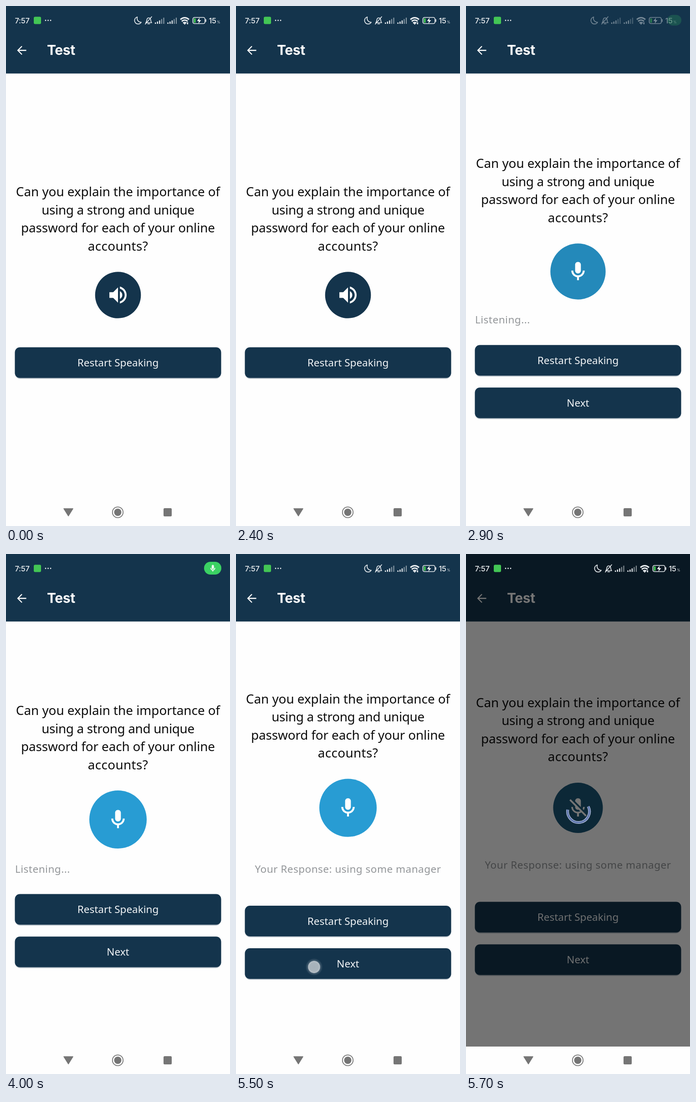
An HTML page for the animation above (5.8 s loop, 492x1137 px).

```html
<!DOCTYPE html>
<html lang="en">
<head>
<meta charset="utf-8">
<title>Speaking test</title>
<style>
  html, body { margin: 0; width: 100%; height: 100%; overflow: hidden; background: #fefefe; }
  svg { display: block; width: 492px; height: 1137px; }
  .soft { filter: blur(.4px); }
  text { font-family: "Noto Sans", "Open Sans", sans-serif; }
  .question { font-size: 27.8px; fill: #0c0c0c; text-anchor: middle; }
  .label { font-size: 22.5px; fill: #f1f4f6; text-anchor: middle; }
  .answer { font-size: 22.5px; letter-spacing: .5px; fill: #939699; }
  .title { font: 700 30px Inter, sans-serif; letter-spacing: -.4px; fill: #fff; }
  .clock { font: 500 16.5px Inter, sans-serif; letter-spacing: -.3px; fill: #edf0f2; }
  .line { fill: none; stroke: #e8ecef; stroke-width: 1.7; stroke-linecap: round; stroke-linejoin: round; }
</style>
</head>
<body>
<svg viewBox="0 0 492 1137">
  <defs>
    <path id="mic" d="M12 14c1.66 0 3-1.34 3-3V5c0-1.66-1.34-3-3-3S9 3.34 9 5v6c0 1.66 1.34 3 3 3zM17 11c0 2.76-2.24 5-5 5s-5-2.24-5-5H5c0 3.53 2.61 6.43 6 6.92V21h2v-3.08c3.39-.49 6-3.39 6-6.92h-2z"/>
    <g id="button">
      <rect x="19.5" y="-32" width="453" height="67.5" rx="12" fill="#14344c" opacity=".3"/>
      <rect x="19.5" y="-33.5" width="453" height="67" rx="11" fill="#14344c"/>
    </g>
    <g id="signal" fill="#e8ecef">
      <path d="M0 36h2.4v3H0zM4.6 34H7v5H4.6zM9.2 31.5h2.4V39H9.2z"/>
      <path d="M13.8 28.5H16V39h-2.2zM18.4 25.5h2.2V39h-2.2z" opacity=".55"/>
    </g>
    <radialGradient id="touchFill">
      <stop offset="0" stop-color="#a6b1ba"/>
      <stop offset=".5" stop-color="#a9b4bc"/>
      <stop offset=".66" stop-color="#b9c2c9"/>
      <stop offset=".74" stop-color="#8393a0" stop-opacity=".4"/>
      <stop offset="1" stop-color="#8393a0" stop-opacity="0"/>
    </radialGradient>
  </defs>

  <g class="soft">
    <rect x="-5" y="-5" width="502" height="1147" fill="#fefefe"/>
    <rect x="-5" y="-5" width="502" height="152.6" fill="#14344c"/>
    <path d="M44.5 97H27M35 88l-9 9 9 9" fill="none" stroke="#fff" stroke-width="2.3"/>
    <text class="title" x="90" y="107">Test</text>

    <g id="question" class="question">
      <text x="246" y="10">Can you explain the importance of</text>
      <text x="246" y="49.5" letter-spacing="-.3">using a strong and unique</text>
      <text x="246" y="89" letter-spacing="-.1">password for each of your online</text>
      <text x="246" y="128.5" letter-spacing=".4">accounts?</text>
    </g>

    <ellipse id="disc" cx="246"/>
    <g id="icons" fill="#fff">
      <path d="M3 9v6h4l5 5V4L7 9H3zM16.5 12c0-1.77-1.02-3.29-2.5-4.03v8.05c1.48-.73 2.5-2.25 2.5-4.02zM14 3.23v2.06c2.89.86 5 3.54 5 6.71s-2.11 5.85-5 6.71v2.06c4.01-.91 7-4.49 7-8.77s-2.99-7.86-7-8.77z"/>
      <use href="#mic"/>
      <path d="M19 11h-1.7c0 .74-.16 1.43-.43 2.05l1.23 1.23c.56-.98.9-2.09.9-3.28zm-4.02.17c0-.06.02-.11.02-.17V5c0-1.66-1.34-3-3-3S9 3.34 9 5v.18l5.98 5.99zM4.27 3L3 4.27l6.01 6.01V11c0 1.66 1.33 3 2.99 3 .22 0 .44-.03.65-.08l1.66 1.66c-.71.33-1.5.52-2.31.52-2.76 0-5.3-2.1-5.3-5.1H5c0 3.41 2.72 6.23 6 6.72V21h2v-3.28c.91-.13 1.77-.45 2.54-.9L19.73 21 21 19.73 4.27 3z"/>
    </g>

    <text id="answer" class="answer"></text>
    <g id="restart"><use href="#button"/><text class="label" x="246" y="8">Restart Speaking</text></g>
    <g id="next"><use href="#button"/><text class="label" x="246" y="8">Next</text></g>
    <circle id="touch" cx="171.5" cy="903" r="19" fill="url(#touchFill)"/>

    <rect id="shade" x="-5" y="-5" width="502" height="1082"/>
    <g id="spinner" fill="none">
      <path d="M268.5 552A24 24 0 1 1 223.5 559" stroke="#a3b1d0" stroke-width="6"/>
      <path d="M268.5 552A24 24 0 1 1 223.5 559" stroke="#5b74ad" stroke-width="3"/>
    </g>

    <text class="clock" x="19.5" y="38">7:57</text>
    <rect x="61" y="23.5" width="16" height="16" rx="3" fill="#43c655"/>
    <path class="line" d="M87 31.5h0M92.5 31.5h0M98 31.5h0" style="stroke-width:2.8"/>

    <g id="status">
      <path class="line" d="M288.5 24a7.8 7.8 0 1 0 8.5 11.5a8.5 8.5 0 0 1-8.5-11.5z"/>
      <path class="line" d="M307 36.5c2-2 2-3 2.3-6 .4-3 2-4.500 4.200-4.500s4 1.500 4.300 4.500c.3 3 .4 4 2.200 6zM311.500 39h4M306 39.500l14-16"/>
      <use href="#signal" x="327"/>
      <use href="#signal" x="354.5"/>
      <g class="line" style="stroke-width:3;stroke-linecap:butt">
        <path d="M383 29.5q9.500-8 19 0M386 33.500q6.500-5.500 13 0M389 37.200q3.500-2.500 7 0"/>
      </g>
      <path d="M389.5 37.500h6l-3 3.500zM397.500 35.500h2.500v4.500h-2.500z" fill="#e8ecef"/>
      <rect class="line" x="410.5" y="25" width="26.5" height="13.5" rx="3.5"/>
      <rect x="412.5" y="27" width="4" height="9.500" rx="1" fill="#43c655"/>
      <path d="M425.5 25.500l-6 7.500h4l-1 5.500 6-7.500h-4z" fill="#fff"/>
      <path d="M439 29.500v4.500" class="line"/>
      <text class="clock" x="445.5" y="38">15</text>
      <text class="clock" x="463.5" y="38" style="font-size:7px">%</text>
    </g>
    <g id="chip">
      <rect id="pill" fill="#3bd163"/>
      <use id="pillMic" href="#mic" fill="#f2fbf4" stroke="#f2fbf4" stroke-width=".7" transform="translate(445.400 22.500) scale(.74)"/>
    </g>

    <g fill="#757575">
      <path d="M127 1099h20l-10 16z" stroke="#757575" stroke-width="1.5" stroke-linejoin="round"/>
      <circle cx="245.5" cy="1107" r="8"/>
      <circle cx="245.5" cy="1107" r="11.7" fill="none" stroke="#757575" stroke-width="1.8"/>
      <rect x="346" y="1098" width="18" height="18" rx="2.5"/>
    </g>
  </g>
</svg>
<script>
const LOOP = 5800, STEP = 100;
const SMALL = 50.3, LARGE = 63;
const NAVY = [20, 52, 76], BLUE = [40, 156, 211];
const el = Object.fromEntries([...document.querySelectorAll("[id]")].map(e => [e.id, e]));

// Each screen: start, disc centre, gaps below the disc, icon, text and its alignment
const screens = [
  { at: 0, cy: 632, button: 97.5, answer: 0, icon: 0, text: "", left: false },
  { at: 2700, cy: 580.5, button: 133.5, answer: 45, icon: 1, text: "Listening...", left: true },
  { at: 4400, cy: 555, button: 184.5, answer: 70.5, text: "Your Response: using", left: false },
  { at: 4600, text: "Your Response: using some" },
  { at: 4800, text: "Your Response: using some manager" },
  { at: 5600, icon: 2 }
];

// time, icon shift, icon opacity, chip opacity, chip size (0 dot, 1 pill)
const statusSteps = [
  [0, 0, 1, 0, .6], [2700, 0, 1, 0, .6], [2800, -8, .8, .08, .7], [2900, -8, .45, .2, .75],
  [3000, -8, .15, .7, .9], [3100, -8, 0, 1, 1], [4100, -8, 0, 1, 1], [4300, -8, 0, 1, .4],
  [4400, -8, .4, 1, 0], [4500, -8, .75, 1, 0], [4600, -8, 1, 1, 0], [4900, -8, 1, 1, 0],
  [5000, -4, 1, .4, 0], [5100, 0, 1, 0, 0], [LOOP, 0, 1, 0, 0]
];

const clamp = x => Math.min(1, Math.max(0, x));
const mix = (a, b, p) => a + (b - a) * p;
const set = (e, attrs) => { for (const k in attrs) e.setAttribute(k, attrs[k]); };
const moveY = (e, y) => set(e, { transform: `translate(0 ${y})` });

function sample(steps, t) {
  const i = steps.findIndex(s => s[0] > t);
  const a = steps[i - 1], b = steps[i];
  return a.slice(1).map((v, k) => mix(v, b[k + 1], (t - a[0]) / (b[0] - a[0])));
}

function drawPage(t) {
  const s = Object.assign({}, ...screens.filter(s => s.at <= t));
  const grow = clamp((t - 2655) / 300) - clamp((t - 5500) / 300);
  const r = mix(SMALL, LARGE, grow);
  const color = NAVY.map((c, i) => Math.round(mix(c, BLUE[i], grow)));

  set(el.disc, { cy: s.cy, rx: r, ry: r + .5, fill: `rgb(${color})` });
  set(el.icons, { transform: `translate(220.8 ${s.cy - 25.2}) scale(2.1)` });
  [...el.icons.children].forEach((icon, i) => set(icon, { opacity: i === s.icon ? 1 : 0 }));
  moveY(el.question, s.cy - 175.5 - r);

  if (el.answer.textContent !== s.text) el.answer.textContent = s.text;
  set(el.answer, {
    x: s.left ? 20 : 246,
    y: s.cy + r + s.answer + 8,
    "text-anchor": s.left ? "start" : "middle"
  });

  const buttonY = s.cy + r + s.button;
  moveY(el.restart, buttonY);
  moveY(el.next, buttonY + 93);
  set(el.next, { opacity: t >= 2700 ? 1 : 0 });
  set(el.touch, { opacity: t >= 5500 && t < 5600 ? 1 : 0 });
  set(el.shade, { opacity: .54 * clamp((t - 5530) / 150) });
  set(el.spinner, { opacity: t >= 5700 ? 1 : 0 });
}

function drawStatus(t) {
  const [shift, icons, chip, size] = sample(statusSteps, t);
  const w = mix(9, 38, size), h = mix(9, 28, size);
  set(el.status, { transform: `translate(${shift} 0)`, opacity: icons });
  set(el.chip, { opacity: chip });
  set(el.pill, { x: 469 - 15 * size - w / 2, y: 31 - h / 2, width: w, height: h, rx: h / 2 });
  set(el.pillMic, { opacity: clamp(size * 4 - 3) });
}

const start = performance.now();
function frame() {
  const elapsed = (performance.now() - start) % LOOP;
  const t = Math.floor(elapsed / STEP) * STEP;
  drawPage(t);
  drawStatus(t);
  requestAnimationFrame(frame);
}
frame();
</script>
</body>
</html>
```
